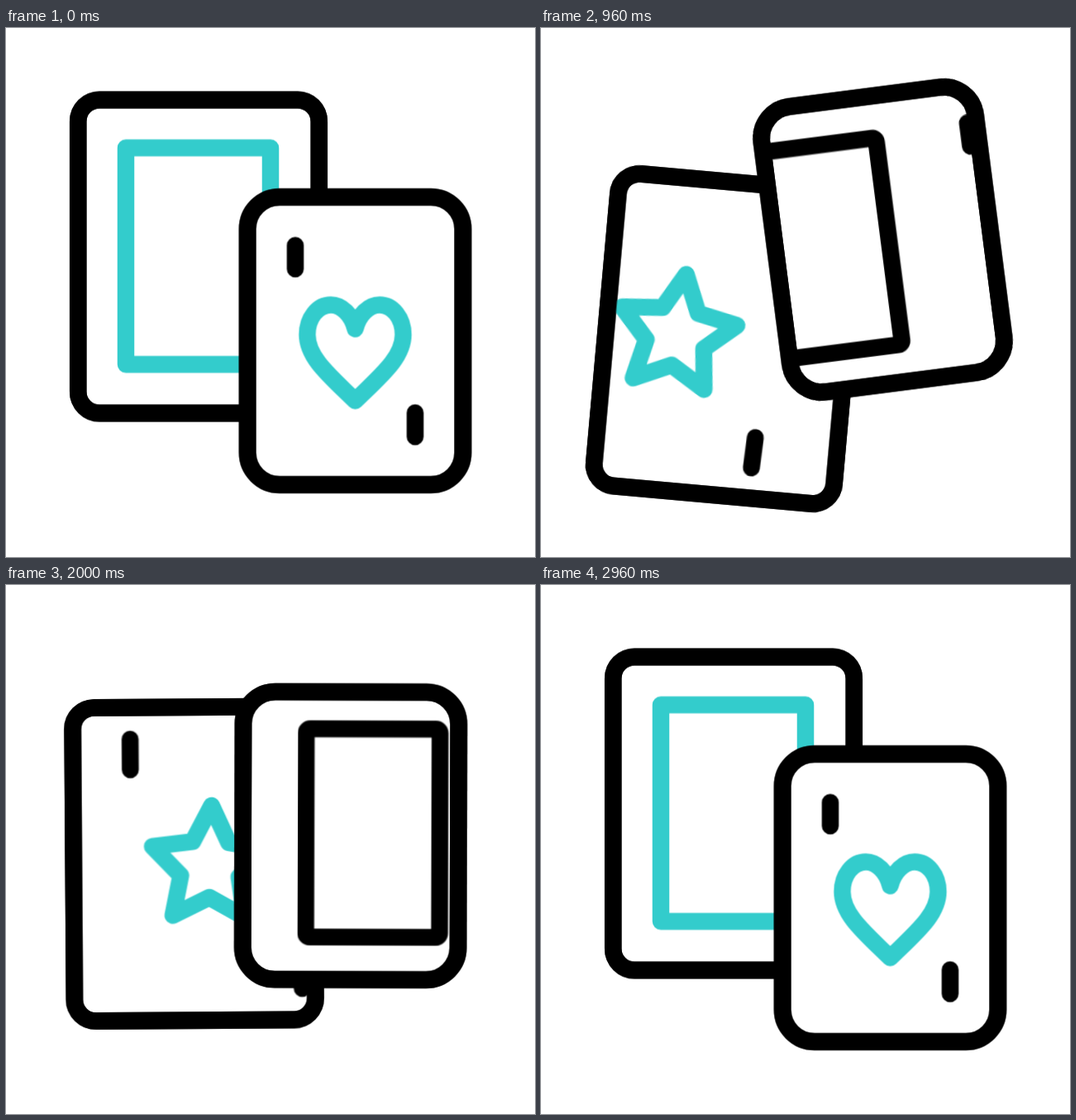
Write an HTML page without scripts that moves like this. It is 640x640 px and loops after 3 s.

```html
<!DOCTYPE html>
<html lang="en">
<head>
<meta charset="utf-8">
<title>Playing cards</title>
<style>
  html, body { margin: 0; width: 100%; height: 100%; overflow: hidden; background: #fff; }
  svg { display: block; width: 100%; height: 100%; fill: none; stroke: #000; stroke-width: 20.5; stroke-linecap: round; stroke-linejoin: round; }
  .teal { stroke: #33cccc; }
  .swing, .belt, .turn { animation: 3s cubic-bezier(.55, 0, .45, 1) infinite; }

  .back .swing { animation-name: back-swing; }
  .front .swing { animation-name: front-swing; }
  .back .belt { animation-name: back-belt; }
  .front .belt { animation-name: front-belt; }
  .turn { animation-name: turn; }

  @keyframes back-swing {
    0%, 7.1%, 98%, 100% { transform: translate(0, 0) rotate(0deg); }
    23.1%, 27.6%, 74.4%, 78.7% { transform: translate(-10.2px, 112.8px) rotate(7deg); }
    43.6%, 58.45% { transform: translate(0, 0) rotate(-9deg); }
  }
  @keyframes front-swing {
    0%, 7.1%, 98%, 100% { transform: translate(0, 0) rotate(0deg); }
    23.1%, 27.55%, 74.4%, 78.7% { transform: translate(-10.2px, -139.5px) rotate(-10deg); }
    43.55%, 58.45% { transform: translate(0, 0) rotate(12deg); }
  }
  /* Each belt carries the card faces past the card from left to right. */
  @keyframes back-belt {
    0%, 11.7% { transform: translate(0, 0); }
    42.9%, 61% { transform: translate(310px, 22px); }
    91%, 100% { transform: translate(620px, -2px); }
  }
  @keyframes front-belt {
    0%, 13.5% { transform: translate(0, 0); }
    44%, 58.3% { transform: translate(266px, -16px); }
    90.9%, 100% { transform: translate(532px, -32px); }
  }
  @keyframes turn {
    0%, 11.7% { transform: rotate(11deg); }
    42.9%, 100% { transform: rotate(0deg); }
  }

  .sparks path {
    stroke-dasharray: 1 3;
    animation: trim 3s ease-in-out infinite, show 3s step-end infinite;
  }
  @keyframes trim {
    0%, 43.5% { stroke-dashoffset: 1; }
    53.3%, 56% { stroke-dashoffset: 0; }
    65.3%, 100% { stroke-dashoffset: -1; }
  }
  @keyframes show {
    0% { opacity: 0; }
    43.8% { opacity: 1; }
    65.2%, 100% { opacity: 0; }
  }
</style>
</head>
<body>
<svg viewBox="0 0 640 640">
  <defs>
    <rect id="back-card" x="-145.8" y="-189.5" width="291.6" height="379" rx="26"/>
    <rect id="front-card" x="-130.3" y="-174" width="260.6" height="348" rx="38.7"/>
    <clipPath id="back-clip"><use href="#back-card"/></clipPath>
    <clipPath id="front-clip"><use href="#front-card"/></clipPath>
    <rect id="frame" class="teal" x="-88" y="-131.5" width="175" height="262"/>
    <g id="heart">
      <path d="M-72.5 -115.5v28.5M72.5 87v29"/>
      <path class="teal" d="M0 -14.5C-4 -31.5 -16.5 -43.5 -29.5 -43.5C-45.5 -43.5 -58 -27.5 -58 -7.5C-58 20.5 -30.5 42.5 0 72.5C30.5 42.5 58 20.5 58 -7.5C58 -27.5 45.5 -43.5 29.5 -43.5C16.5 -43.5 4 -31.5 0 -14.5Z"/>
    </g>
  </defs>

  <g class="sparks teal">
    <path pathLength="1" d="M415.5 124C425 113 427 104 425 93C422 80 414 66 430 46"/>
    <path pathLength="1" d="M478 114.5C520 106 500 62 540 51.5"/>
    <path pathLength="1" d="M508.5 162.5L554.5 162"/>
    <path pathLength="1" d="M217 514.5C170 517 192 562 143.5 563"/>
    <path pathLength="1" d="M253.5 553L255 597"/>
  </g>

  <g class="back" transform="translate(233 276.5)">
    <g class="swing">
      <use href="#back-card" fill="#fff"/>
      <g clip-path="url(#back-clip)">
        <g class="belt">
          <use href="#frame"/>
          <g transform="translate(-310 -22)">
            <g class="turn">
              <path d="M-91.7 -150v37M114.5 116v37"/>
              <path class="teal" transform="translate(4 5) rotate(1.8)" d="M0 -74L21.7 -29.9L70.4 -22.9L35.2 11.4L43.5 59.9L0 37L-43.5 59.9L-35.2 11.4L-70.4 -22.9L-21.7 -29.9Z"/>
            </g>
          </g>
          <use href="#frame" x="-620" y="2"/>
        </g>
      </g>
      <use href="#back-card"/>
    </g>
  </g>

  <g class="front" transform="translate(422.5 378.5)">
    <g class="swing">
      <use href="#front-card" fill="#fff"/>
      <g clip-path="url(#front-clip)">
        <g class="belt">
          <use href="#heart"/>
          <rect x="-346.7" y="-111.8" width="162" height="252" rx="5"/>
          <use href="#heart" x="-532" y="32"/>
        </g>
      </g>
      <use href="#front-card"/>
    </g>
  </g>
</svg>
</body>
</html>
```
